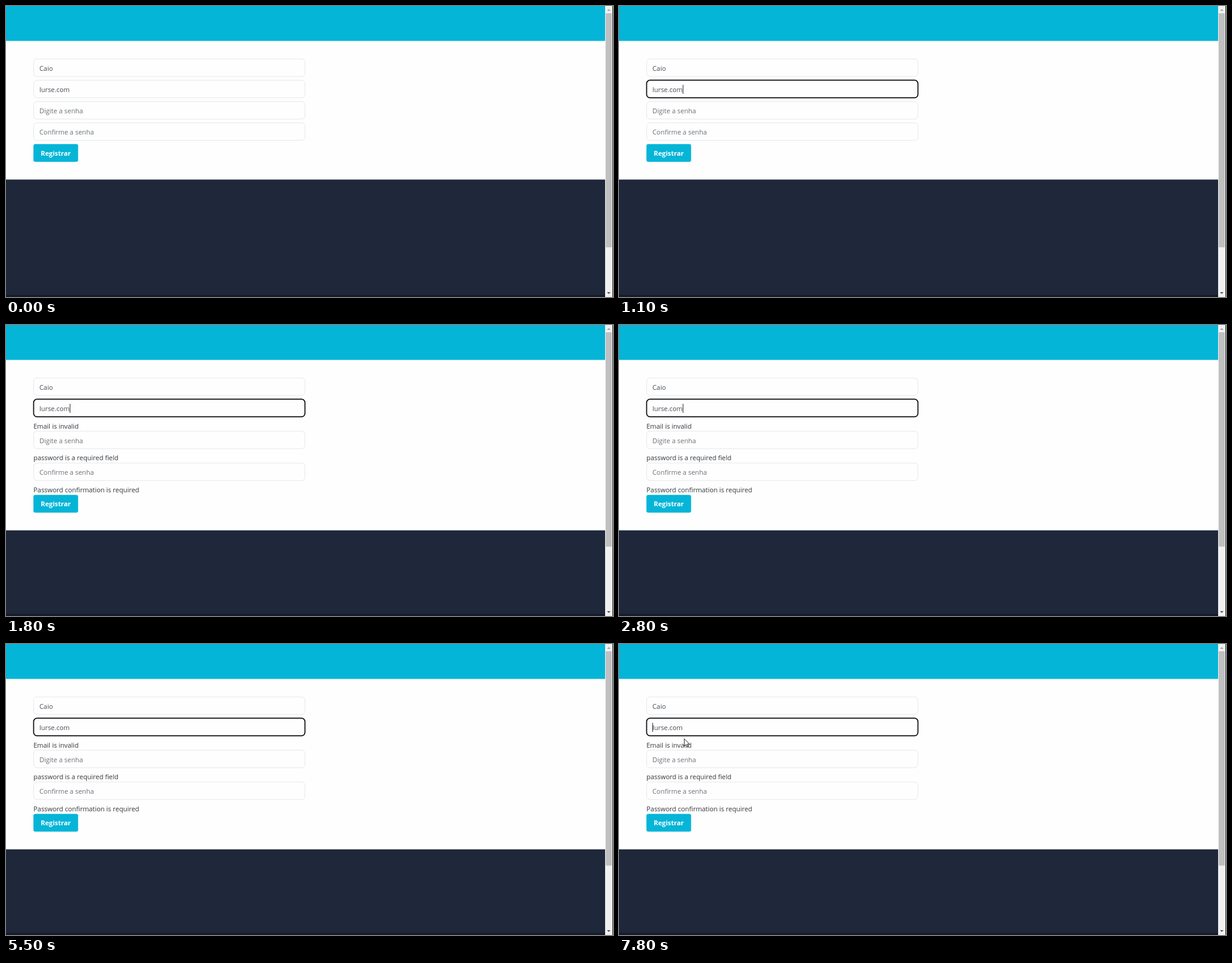
An HTML page that plays this animation: 1000x480 px, repeating every 8 s.

```html
<!DOCTYPE html>
<html lang="pt">
<head>
<meta charset="utf-8">
<title>Registro</title>
<style>
  html, body { margin: 0; width: 100%; height: 100%; overflow: hidden; background: #fefefe; }
  svg { display: block; width: 1000px; height: 480px; }
  text { font: 10.9px "Open Sans", "Noto Sans", sans-serif; fill: #6b7078; white-space: pre; }
  .value { fill: #474d57; }
  .error { fill: #33363b; }
  .label { font-weight: 700; fill: #fff; }
  .field { fill: #fefefe; stroke: #e6e8eb; stroke-width: 1; }
  .field.focus { stroke: #0c0d10; stroke-width: 1.7; }
</style>
</head>
<body>
<svg viewBox="0 0 1000 480" xmlns="http://www.w3.org/2000/svg">
  <rect width="1000" height="480" fill="#fefefe"/>
  <rect width="987" height="57.6" fill="#05b5d7"/>
  <rect id="footer" width="987" height="200" fill="#1e283a"/>
  <rect y="476.6" width="987" height="3.4" fill="#151b29"/>

  <g id="form"></g>
  <rect id="caret" y="130" width="1" height="15" fill="#30343a"/>

  <rect x="987" width="12" height="480" fill="#f1f1f1"/>
  <rect x="999" width="1" height="480" fill="#2a2a2a"/>
  <rect id="thumb" x="988" y="12" width="10" fill="#c0c0c0"/>
  <path d="M990.2 8h5.6l-2.8-3z" fill="#a3a3a3"/>
  <path d="M990.2 472h5.6l-2.8 3z" fill="#505050"/>

  <g id="hand" fill="#fff" stroke="#1b1b1b" stroke-width="0.9" stroke-linejoin="round">
    <path d="M3.2 10V1.6C3.2 0 5.6 0 5.6 1.6V6.2C6.2 5.5 7.4 5.7 7.6 6.7C8.3 6.1 9.4 6.4 9.6 7.4C10.4 6.9 11.3 7.4 11.3 8.4V12.2C11.3 14 10 15 10 17.3H4.3C4.3 15.4 2.4 13.8.7 10.8C-.1 9.3 1.6 8.4 2.4 9.3z"/>
    <path d="M5.6 6.2V9.4M7.6 6.7V9.4M9.6 7.4V9.6" fill="none" stroke-width="0.6"/>
  </g>
  <path id="arrow" d="M0 0V12L2.8 9.5L4.7 13.8L6.5 13L4.6 8.8H8.6z" fill="#fff" stroke="#1b1b1b" stroke-width="0.9" stroke-linejoin="round"/>
</svg>

<script>
const LOOP = 8000;
const LEFT = 45.5, TOP = 87.3, PITCH = 35.15, ERROR_H = 17.5;
const CARET_END = 105, CARET_HOME = 55;
const BUTTON = "#05b5d7", BUTTON_HOVER = "#22d0ee";

const rows = [
  { text: "Caio", kind: "value" },
  { text: "lurse.com", kind: "value", error: "Email is invalid" },
  { text: "Digite a senha", error: "password is a required field" },
  { text: "Confirme a senha", error: "Password confirmation is required" }
];

// Each list holds [start time, state]; a state lasts until the next entry.
const focusSteps = [[0, false], [100, true], [1600, false], [1800, true]];
const errorSteps = [[0, false], [1800, true]];
const hoverSteps = [[0, false], [1300, true], [1800, false]];
const handSteps = [[0, null], [1300, [97, 238]], [1400, [94, 244.5]], [1800, null]];
const arrowSteps = [[0, null], [7200, [104, 154]], [7300, [107.5, 156.3]]];
const caretSteps = [[0, null], ...blink(CARET_END, 100, 600, 1100, 1600),
  ...blink(CARET_END, 1800, 2300, 2800, 3300, 3900, 4400, 4900, 5500, 6000, 6500),
  ...blink(CARET_HOME, 6700, 7300, 7800)];

function blink(x, ...times) {
  return times.map((t, i) => [t, i % 2 ? null : x]);
}

function stateAt(steps, t) {
  let state = steps[0][1];
  for (const [start, value] of steps) if (t >= start) state = value;
  return state;
}

const $ = id => document.getElementById(id);
const form = $("form");

function add(parent, tag, attrs, text = "") {
  const el = document.createElementNS("http://www.w3.org/2000/svg", tag);
  for (const key in attrs) el.setAttribute(key, attrs[key]);
  el.textContent = text;
  parent.append(el);
  return el;
}

function addRow({ text, kind = "", error }) {
  const group = add(form, "g", {});
  const box = add(group, "rect", { class: "field", x: LEFT, width: 447, height: 28.9, rx: 5.5 });
  add(group, "text", { x: 55, y: 19.6, class: kind }, text);
  const note = error && add(group, "text", { x: 45.3, y: 48.4, class: "error" }, error);
  return { group, box, note };
}

const fields = rows.map(addRow);
const submit = add(form, "g", {});
const face = add(submit, "rect", { x: 45.2, y: 0.2, width: 73.6, height: 29.3, rx: 3 });
add(submit, "text", { x: 57.2, y: 19.4, class: "label" }, "Registrar");

function show(el, visible) {
  el.setAttribute("visibility", visible ? "visible" : "hidden");
}

function moveTo(el, x, y) {
  el.setAttribute("transform", `translate(${x} ${y})`);
}

function place(el, point) {
  show(el, point);
  if (point) moveTo(el, ...point);
}

function draw(t) {
  const errors = stateAt(errorSteps, t);
  let y = TOP;
  for (const { group, note } of fields) {
    moveTo(group, 0, y);
    y += PITCH;
    if (note) {
      show(note, errors);
      if (errors) y += ERROR_H;
    }
  }
  moveTo(submit, 0, y - 0.4);
  face.setAttribute("fill", stateAt(hoverSteps, t) ? BUTTON_HOVER : BUTTON);
  fields[1].box.classList.toggle("focus", stateAt(focusSteps, t));

  $("footer").setAttribute("y", errors ? 338.7 : 286.3);
  $("thumb").setAttribute("height", errors ? 353.5 : 386);

  const caret = stateAt(caretSteps, t);
  show($("caret"), caret !== null);
  if (caret !== null) $("caret").setAttribute("x", caret);

  place($("hand"), stateAt(handSteps, t));
  place($("arrow"), stateAt(arrowSteps, t));
}

const start = performance.now();
function tick() {
  draw((performance.now() - start) % LOOP);
  requestAnimationFrame(tick);
}
tick();
</script>
</body>
</html>
```
